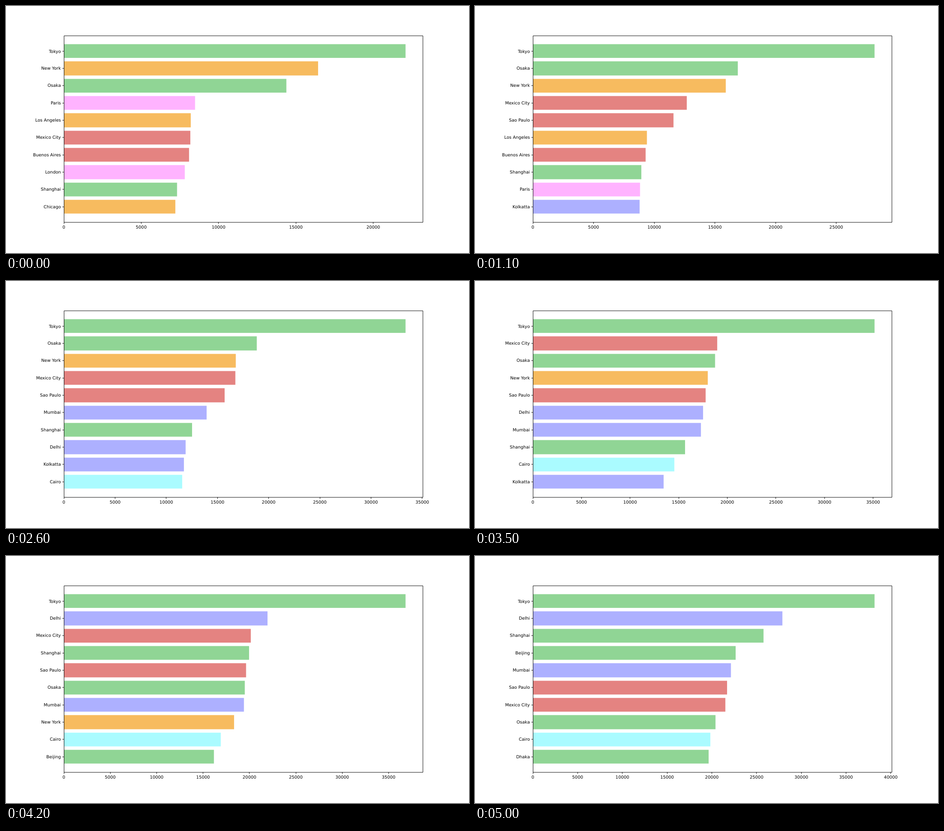
Write an HTML page that moves like this. It is 1025 px wide and 547 px high and loops after 5.1 s.

```html
<!DOCTYPE html>
<html lang="en">
<head>
<meta charset="utf-8">
<title>Largest cities</title>
<style>
  html, body { margin: 0; width: 100%; height: 100%; overflow: hidden; background: #fff; }
  svg { display: block; width: 100vw; height: 100vh; }
  text { font: 10px "DejaVu Sans", sans-serif; fill: #000; text-rendering: geometricPrecision; }
  path { fill: none; stroke: #000; stroke-width: 1; }
</style>
</head>
<body>
<svg id="chart" viewBox="0 0 1080 576" preserveAspectRatio="none"></svg>
<script>
const asia = '#90d595', india = '#adb0ff', north = '#f7bb5f',
      latin = '#e48381', europe = '#ffb3ff', east = '#aafbff';

// Populations in thousands change linearly between these years.
const keyYears = [1968, 1975, 1979, 1987, 1994, 2003, 2010, 2018];

// name, colour, index of first key year, values
const cities = [
  ['Tokyo', asia, 0, [22092, 26615, 28162, 31194, 33376, 35153, 36834, 38194]],
  ['New York', north, 0, [16428, 17150, 15911, 15931, 16790, 17995, 18365, 18713]],
  ['Osaka', asia, 0, [14371, 16298, 16882, 17923, 18831, 18735, 19492, 20409]],
  ['Paris', europe, 0, [8477, 9400, 8830]],
  ['Los Angeles', north, 0, [8199, 8926, 9395, 10462, 11248]],
  ['Mexico City', latin, 0, [8170, 11339, 12690, 14824, 16742, 18960, 20132, 21520]],
  ['Buenos Aires', latin, 0, [8097, 8745, 9290, 10179, 11100]],
  ['London', europe, 0, [7820, 7180]],
  ['Shanghai', asia, 0, [7324, 7991, 8946, 10880, 12520, 15642, 19980, 25779]],
  ['Chicago', north, 0, [7207, 7160]],
  ['Sao Paulo', latin, 0, [6960, 9614, 11594, 13935, 15690, 17778, 19650, 21698]],
  ['Kolkatta', india, 0, [6600, 7888, 8800, 10330, 11720, 13460, 14283]],
  ['Rio de Janeiro', latin, 0, [6300, 8100, 8650, 9300]],
  ['Mumbai', india, 1, [7082, 8340, 11200, 13935, 17280, 19422, 22120]],
  ['Delhi', india, 3, [8000, 11890, 17500, 21935, 27890]],
  ['Cairo', east, 3, [9000, 11550, 14556, 16899, 19850]],
  ['Beijing', asia, 5, [11800, 16185, 22674]],
  ['Dhaka', asia, 6, [14731, 19633]]
];

const xMin = 135, xMax = 972, yMin = 69.12, yMax = 504;
const step = (yMax - yMin) / 10.78;        // ten bars, 0.8 high, 5% margins
const svg = document.getElementById('chart');

function population(start, values, year) {
  const k = Math.max(1, keyYears.findIndex(y => y >= year));
  const a = values[k - 1 - start], b = values[k - start];
  const part = (year - keyYears[k - 1]) / (keyYears[k] - keyYears[k - 1]);
  return a + (b - a) * part || 0;
}

const label = (x, y, text, anchor) =>
  `<text x="${x}" y="${y}" text-anchor="${anchor}">${text}</text>`;
const line = d => `<path d="${d}"/>`;

function draw(year) {
  const ranked = cities
    .map(([name, color, start, values]) => ({ name, color, value: population(start, values, year) }))
    .sort((a, b) => b.value - a.value)
    .slice(0, 10);
  const max = ranked[0].value * 1.05;
  const toX = v => xMin + (xMax - xMin) * v / max;
  let out = '';

  ranked.forEach(({ name, color, value }, i) => {
    const mid = yMin + (0.89 + i) * step;
    const y0 = Math.round(mid - 0.4 * step), y1 = Math.round(mid + 0.4 * step);
    out += `<rect x="${xMin}" y="${y0}" width="${Math.round(toX(value)) - xMin}" height="${y1 - y0}" fill="${color}"/>`
      + line(`M${xMin - 3.5} ${Math.floor(mid) + 0.5}H${xMin}`)
      + label(xMin - 7, Math.round(mid + 3.7), name, 'end');
  });

  for (let v = 0; v <= max; v += 5000) {
    const x = toX(v);
    out += line(`M${Math.floor(x) + 0.5} ${yMax}v4`) + label(x, 519, v, 'middle');
  }
  svg.innerHTML = out + line(`M${xMin + 0.5} 69.5H${xMax + 0.5}V${yMax + 0.5}H${xMin + 0.5}Z`);
}

let shown;
function animate() {
  const year = 1968 + Math.floor(performance.now() / 100) % 51;
  if (year !== shown) draw(shown = year);
  requestAnimationFrame(animate);
}
animate();
</script>
</body>
</html>
```
